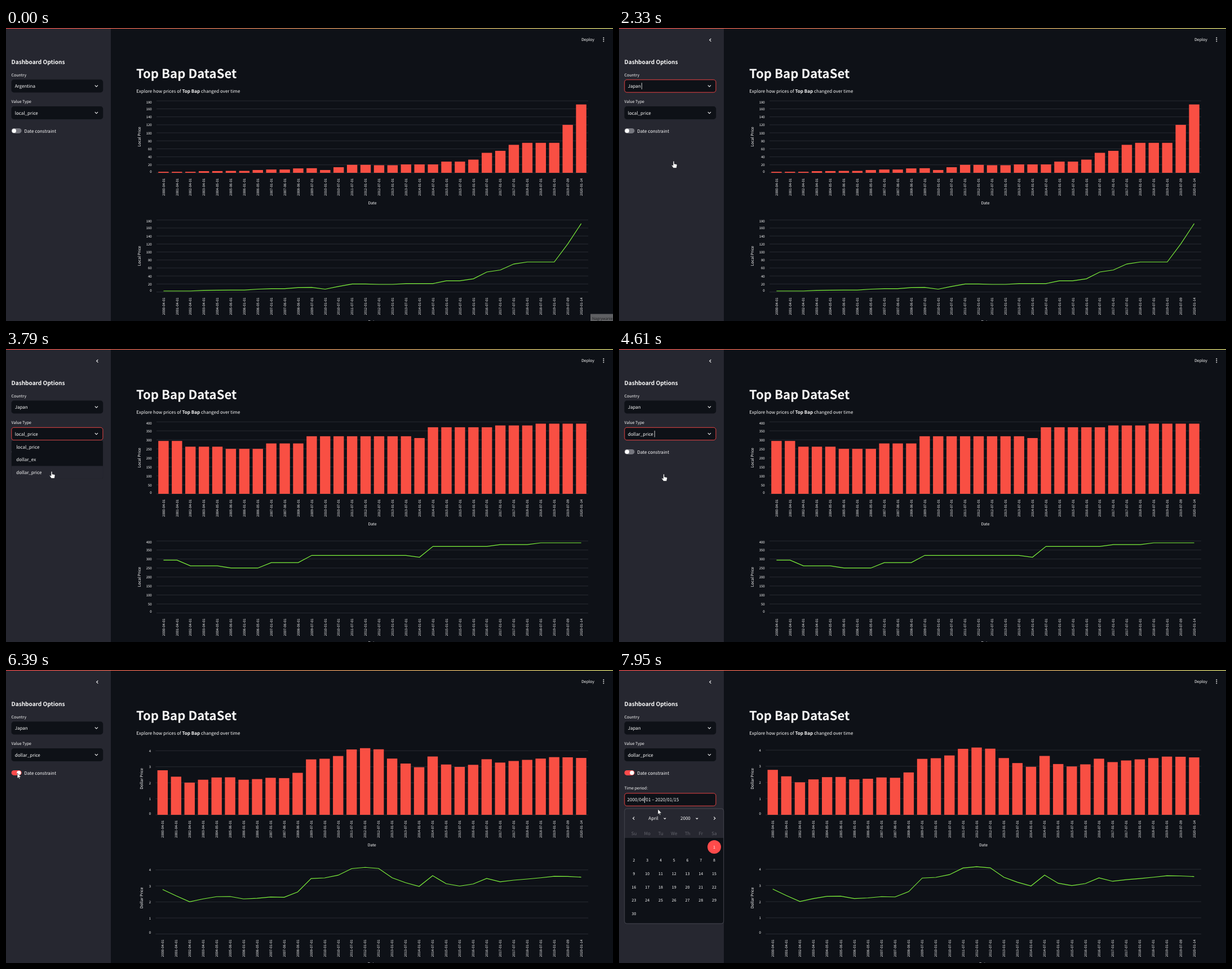
Recreate the animation shown at these times as an HTML page. Size 1077 px wide and 520 px high, loop 8 s.

```html
<!DOCTYPE html>
<html lang="en">
<head>
<meta charset="utf-8">
<title>Price dashboard</title>
<style>
html, body { margin: 0; width: 100%; height: 100%; overflow: hidden; background: #0e1117; }
svg { display: block; width: 1077px; height: 520px; }
text { font-family: "Noto Sans CJK JP", "Noto Sans CJK SC", "Noto Sans", sans-serif; fill: #fafafa; white-space: pre; text-rendering: geometricPrecision; }
</style>
</head>
<body>
<svg id="stage" viewBox="0 0 1077 520"></svg>
<script>
const LOOP = 8000, ROW = 22.64;
const DARK = '#0e1117', PANEL = '#262730', RED = '#ff4b4b', WHITE = '#fafafa';
const BODY = 8.03, SMALL = 7.03, TICK = 6.03;
const stage = document.getElementById('stage');
const timed = [];

function add(parent, tag, attrs = {}, content) {
  const node = document.createElementNS('http://www.w3.org/2000/svg', tag);
  for (const key in attrs) node.setAttribute(key, attrs[key]);
  if (content !== undefined) node.textContent = content;
  parent.append(node);
  return node;
}
const group = (parent = stage, attrs) => add(parent, 'g', attrs);
const rect = (parent, x, y, width, height, fill, more) =>
  add(parent, 'rect', { x, y, width, height, fill, ...more });
// y is the middle of the capitals
const text = (parent, x, y, content, size = BODY, more) =>
  add(parent, 'text', { x, y: y + size * 0.365, 'font-size': size, ...more }, content);
const stroke = (parent, d, color = WHITE, width = 1.1) =>
  add(parent, 'path', { d, fill: 'none', stroke: color, 'stroke-width': width });
const chevron = (parent, x, y, dx, dy) => stroke(parent, dx
  ? `M${x - dx / 2} ${y - 2.5}l${dx} 2.5l${-dx} 2.5`
  : `M${x - dy} ${y - dy / 2}l${dy} ${dy}l${dy} ${-dy}`);
// Show a node only inside the given [from, to) spans
function during(node, ...spans) {
  timed.push({ node, spans });
  return node;
}

// ---------- charts ----------
const dates = ('00-04 01-04 02-04 03-04 04-05 05-06 06-01 06-05 07-01 07-06 08-06 09-07 10-01 10-07 ' +
  '11-07 12-01 12-07 13-01 13-07 14-01 14-07 15-01 15-07 16-01 16-07 17-01 17-07 18-01 18-07 19-01 ' +
  '19-07-09 20-01-14').split(' ').map(d => '20' + d + (d.length < 6 ? '-01' : ''));
const run = (...pairs) => pairs.flatMap(([value, count]) => Array(count).fill(value));
const pesos = [2.5, 2.5, 2.5, 4.1, 4.36, 4.75, 4.75, 7, 8.25, 8.25, 11, 11.5, 7, 14, 20, 20, 19, 19,
  21, 21, 21, 28, 28, 33, 50, 55, 70, 75, 75, 75, 120, 171];
const yen = run([294, 2], [262, 3], [250, 3], [280, 3], [320, 8], [310, 1], [370, 5], [380, 3], [390, 4]);
const dollars = [2.78, 2.38, 2.01, 2.19, 2.33, 2.34, 2.19, 2.23, 2.31, 2.29, 2.62, 3.46, 3.5, 3.67, 4.08,
  4.16, 4.09, 3.51, 3.2, 2.97, 3.64, 3.14, 2.99, 3.12, 3.47, 3.26, 3.36, 3.43, 3.51, 3.6, 3.59, 3.55];

function plot(parent, o, bottom, asBars) {
  const right = 1033, band = (right - o.left) / 32.04;
  const px = i => o.left + band * (i + 0.52);
  const py = v => bottom - v * o.unit;
  for (let v = 0; v <= o.top; v += o.step) {
    const y = py(v);
    stroke(parent, `M${o.left} ${y}H${right}`, '#33353e', 0.7);
    const shift = v === 0 ? -2.6 : v === o.top && o.flush ? 2.4 : 0.3;
    text(parent, o.left - 8.3, y + shift, v, TICK, { 'text-anchor': 'end' });
  }
  if (asBars) {
    o.data.forEach((v, i) => rect(parent, px(i) - 9.2, py(v), 18.4, bottom - py(v), '#f94f43'));
  } else {
    add(parent, 'polyline', { points: o.data.map((v, i) => `${px(i)},${py(v)}`).join(' '),
      fill: 'none', stroke: '#7df23b', 'stroke-width': 1.15 });
  }
  dates.forEach((d, i) => text(group(parent, { transform: `translate(${px(i)} ${bottom + 9.8}) rotate(-90)` }),
    0, 0, d, TICK, { 'text-anchor': 'end' }));
  text(group(parent, { transform: `translate(${o.titleX} ${bottom - 64}) rotate(-90)` }),
    0, 0, o.title, SMALL, { 'text-anchor': 'middle' });
  text(parent, (o.left + right) / 2, bottom + 53.2, 'Date', SMALL, { 'text-anchor': 'middle' });
}
function charts(options, span) {
  const g = during(group(), span);
  plot(g, options, 257, true);
  plot(g, options, 468.5, false);
}

rect(stage, 0, 0, 1077, 520, DARK);
charts({ data: pesos, left: 267, unit: 127.7 / 180, top: 180, step: 20, flush: true, title: 'Local Price', titleX: 236 }, [0, 2500]);
charts({ data: yen, left: 267, unit: 127.7 / 400, top: 400, step: 50, flush: true, title: 'Local Price', titleX: 236 }, [2500, 4800]);
charts({ data: dollars, left: 265.4, unit: 28.43, top: 4, step: 1, title: 'Dollar Price', titleX: 240.7 }, [4800, 6450]);
charts({ data: dollars, left: 260.2, unit: 28.7, top: 4, step: 1, title: 'Dollar Price', titleX: 236 }, [6450, LOOP]);

// ---------- page header ----------
text(stage, 231, 81, 'Top Bap DataSet', 22.1, { 'font-weight': 700 });
const intro = text(stage, 231.3, 112, 'Explore how prices of ');
add(intro, 'tspan', { 'font-weight': 700 }, 'Top Bap');
add(intro, 'tspan', {}, ' changed over time');
text(stage, 1021, 20.7, 'Deploy', SMALL);
for (const y of [17.4, 20.5, 23.6]) add(stage, 'circle', { cx: 1060.3, cy: y, r: 0.95, fill: WHITE });

const running = during(group(), [2700, 3160], [5000, 5400], [6650, 7070]);
const GREY = '#7c7f88';
for (const x of [925.8, 934.4]) add(running, 'circle', { cx: x, cy: 23, r: 2.8, fill: 'none', stroke: GREY, 'stroke-width': 0.8 });
stroke(running, 'M925.8 23L928 19L931 21.5L930 24.5M928 19L931.5 16.5L933 18.7H935M934.4 23L932.8 18.7', GREY, 1);
add(running, 'circle', { cx: 932.6, cy: 15, r: 1.2, fill: GREY });
text(running, 942, 20.7, 'RUNNING...', SMALL, { style: 'fill:#858891' });
text(running, 990.8, 20.7, 'Stop', SMALL);

// ---------- sidebar ----------
rect(stage, 0, 0, 186, 520, PANEL);
text(stage, 9.6, 60.3, 'Dashboard Options', 10.04, { 'font-weight': 600 });
during(chevron(stage, 162, 21.3, -2.7, 0), [700, LOOP]);

function field(parent, label, labelY, y, focus) {
  text(parent, 9.6, labelY, label, SMALL);
  rect(parent, 9.5, y - 11.4, 162.7, 22.8, DARK, { rx: 4.4 });
  during(rect(parent, 9.8, y - 11.2, 162.1, 22.4, 'none', { rx: 4.2, stroke: RED, 'stroke-width': 0.9 }), focus);
}
field(stage, 'Country', 83, 103, [900, 3400]);
during(text(stage, 15.7, 103.3, 'Argentina'), [0, 2330]);
during(text(stage, 15.7, 103.3, 'Japan'), [2330, LOOP]);
chevron(stage, 160.4, 103, 0, 2.6);
field(stage, 'Value Type', 130.6, 150.5, [3400, 6280]);
during(text(stage, 15.7, 150.8, 'local_price'), [0, 4610]);
during(text(stage, 15.7, 150.8, 'dollar_price'), [4610, LOOP]);
chevron(stage, 160.4, 150.5, 0, 2.6);

const track = rect(stage, 9.6, 177.9, 18, 9, '#75767e', { rx: 4.5 });
const knob = add(stage, 'circle', { cx: 14.3, cy: 182.4, r: 3.7, fill: '#fff' });
text(stage, 32.2, 182.6, 'Date constraint');

const period = during(group(), [6450, LOOP]);
field(period, 'Time period:', 209.6, 230, [7540, LOOP]);
text(period, 14.6, 230.3, '2000/04/01 – 2020/01/15');

// Text carets: from, to, x, y
for (const [from, to, x, y] of [
  [900, 1600, 54, 103], [2130, 2330, 54, 103], [2330, 3400, 40.3, 103],
  [3400, 3590, 58, 150.7], [4120, 4610, 58, 150.7],
  [4610, 5140, 63.2, 150.7], [5670, 6180, 63.2, 150.7], [7540, LOOP, 45.4, 230.2]
]) during(rect(stage, x - 0.4, y - 5.7, 0.8, 11.4, WHITE), [from, to]);

// ---------- drop-down lists ----------
function dropdown(id, y, items, span) {
  const height = Math.min(168.8, items.length * ROW);
  const g = during(group(), span);
  const clip = add(g, 'clipPath', { id });
  rect(clip, 9.5, y, 162.7, height, DARK, { rx: 4 });
  const box = group(g, { 'clip-path': `url(#${id})` });
  rect(box, 9.5, y, 162.7, height, DARK);
  const list = group(box);
  const mark = rect(list, 9.5, y, 162.7, ROW, PANEL);
  items.forEach((item, i) => text(list, 18.3, y + ROW * (i + 0.5), item));
  return { box, list, mark, y, count: items.length };
}
function updateList(menu, hoverY, scroll) {
  const index = Math.max(0, Math.min(menu.count - 1, Math.floor((hoverY - menu.y + scroll) / ROW)));
  menu.list.setAttribute('transform', `translate(0 ${-scroll})`);
  menu.mark.setAttribute('y', menu.y + index * ROW);
}
const countries = dropdown('countries', 114.9, ['Argentina', 'Australia', 'Brazil', 'Canada', 'Switzerland',
  'Chile', 'China', 'Czech Republic', 'Denmark', 'Euro area', 'Britain', 'Hong Kong', 'Hungary', 'Indonesia',
  'Japan', 'South Korea', 'Mexico', 'Malaysia', 'Norway'], [900, 2330]);
const thumb = rect(countries.box, 168.8, 116, 3.4, 20.5, '#777880', { rx: 0.6 });
const valueTypes = dropdown('types', 162.3, ['local_price', 'dollar_ex', 'dollar_price'], [3400, 4610]);

// ---------- calendar ----------
const calendar = during(group(), [7540, LOOP]);
rect(calendar, 9.8, 246, 175.9, 204, DARK, { rx: 4 });
rect(calendar, 9.8, 246, 175.9, 52, PANEL);
rect(calendar, 9.8, 246, 175.9, 204, 'none', { rx: 4, stroke: '#51525b', 'stroke-width': 0.8 });
chevron(calendar, 26, 263.2, -2.6, 0);
chevron(calendar, 169.5, 263.2, 2.6, 0);
text(calendar, 52.3, 263, 'April');
text(calendar, 109, 263, '2000');
chevron(calendar, 81.3, 263.5, 0, 1.8);
chevron(calendar, 138.3, 263.5, 0, 1.8);
const dayX = column => 26.5 + 23.75 * column;
['Su', 'Mo', 'Tu', 'We', 'Th', 'Fr', 'Sa'].forEach((name, i) =>
  text(calendar, dayX(i), 289.6, name, BODY, { 'text-anchor': 'middle', style: 'fill:#62636b' }));
add(calendar, 'circle', { cx: dayX(6), cy: 314, r: 12, fill: RED });
for (let day = 1; day <= 30; day++) {
  const cell = day + 5;
  text(calendar, dayX(cell % 7), 314 + 23.72 * Math.floor(cell / 7), day, SMALL, { 'text-anchor': 'middle' });
}

rect(stage, 0, 0, 1077, 1.15, 'url(#rainbow)');
const gradient = add(stage, 'linearGradient', { id: 'rainbow' });
add(gradient, 'stop', { offset: 0, 'stop-color': RED });
add(gradient, 'stop', { offset: 1, 'stop-color': '#fffd80' });

const hint = during(group(), [0, 50]);
rect(hint, 1037, 507.5, 40, 12.5, '#5f6063');
text(hint, 1040, 516, 'Nagrywanie', 6.6, { style: 'fill:#1d1e20;font-family:"Open Sans",sans-serif' });

// ---------- pointer ----------
const pointer = during(group(), [50, LOOP]);
const edge = { stroke: '#15161b', 'stroke-width': 0.6, fill: '#fff' };
const shapes = {
  arrow: add(pointer, 'path', { d: 'M0 0V9.3L2.2 7.4L3.7 10.8L5 10.2L3.6 6.9H6.6Z', ...edge }),
  hand: add(pointer, 'path', { d: 'M-1 1Q0-.8 1 1V5L5 5.8Q6 6 6 7.5L5 12.5H-.5L-3.8 8Q-3.5 6.5-1 8Z', ...edge }),
  beam: stroke(pointer, 'M-1.6-4.6H1.6M0-4.6V4.6M-1.6 4.6H1.6', '#fff', 0.9)
};
const moves = [
  [50, 1065, 505, 'arrow'], [700, 186, 165, 'arrow'], [830, 130, 101, 'hand'], [960, 130, 101, 'hand'],
  [1230, 117, 137, 'hand'], [1350, 117, 137, 'hand'], [1660, 100, 185, 'hand'], [1710, 100, 186, 'hand'],
  [1980, 97, 236, 'hand'], [2350, 97, 236, 'arrow'], [2800, 83, 195, 'arrow'], [3110, 83, 195, 'arrow'],
  [3330, 88, 152, 'hand'], [3430, 88, 152, 'hand'], [3640, 81, 217, 'hand'], [3790, 81, 217, 'hand'],
  [4160, 79.5, 222, 'hand'], [4700, 79.5, 222, 'arrow'], [5390, 42, 201, 'arrow'], [5500, 42, 201, 'arrow'],
  [6000, 20, 183, 'hand'], [6380, 20, 183, 'arrow'], [6800, 39, 206, 'arrow'], [6880, 39, 206, 'arrow'],
  [7070, 46, 219, 'beam'], [7330, 47, 226, 'beam'], [7620, 47, 226, 'arrow'], [7900, 69, 247, 'arrow']
];
const ease = u => { u = Math.max(0, Math.min(1, u)); return u * u * (3 - 2 * u); };
const mix = (a, b, u) => a + (b - a) * u;
function pointerAt(t) {
  const i = Math.max(0, moves.findLastIndex(m => m[0] <= t));
  const from = moves[i], to = moves[i + 1] || from;
  const u = ease((t - from[0]) / (to[0] - from[0] || 1));
  return { x: mix(from[1], to[1], u), y: mix(from[2], to[2], u), kind: from[3] };
}

function render(t) {
  for (const { node, spans } of timed)
    node.style.display = spans.some(([from, to]) => t >= from && t < to) ? '' : 'none';
  const p = pointerAt(t);
  pointer.setAttribute('transform', `translate(${p.x} ${p.y})`);
  for (const kind in shapes) shapes[kind].style.display = kind === p.kind ? '' : 'none';

  const scroll = 208 * ease((t - 1380) / 260);
  updateList(countries, t < 1350 ? 0 : p.y, scroll);
  thumb.setAttribute('y', 116 + scroll * 0.13);
  updateList(valueTypes, p.y, 0);

  knob.setAttribute('cx', mix(14.3, 23, ease((t - 6280) / 120)));
  track.setAttribute('fill', t < 6280 ? '#75767e' : RED);
}

const start = performance.now();
function tick() {
  render((performance.now() - start) % LOOP);
  requestAnimationFrame(tick);
}
tick();
</script>
</body>
</html>
```
